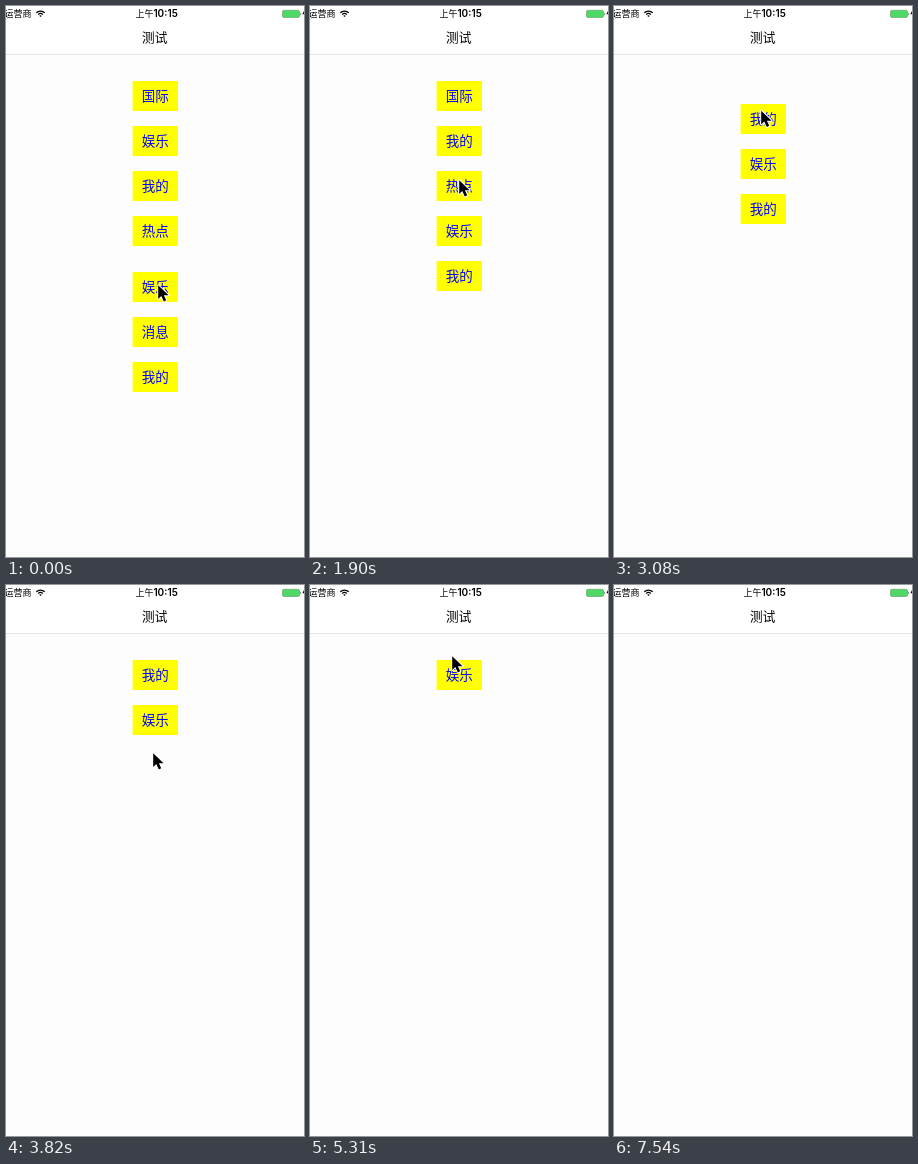
Write an HTML page that moves like this. It is 298 by 551 pixels and loops after 7.84 s.

```html
<!DOCTYPE html>
<html lang="zh-CN">
<head>
<meta charset="utf-8">
<title>测试</title>
<style>
  html, body { margin: 0; width: 100%; height: 100%; overflow: hidden; background: #fdfdfd; }
  svg { display: block; }
  text { font-family: "Noto Sans CJK SC", "Noto Sans CJK", sans-serif; }
  .num { font: 600 10px Inter, sans-serif; }
  .status { font-size: 9px; }
  .medium { font-weight: 500; }
  .title { font-size: 12.6px; font-weight: 500; text-anchor: middle; }
  .tag text { font-size: 13.5px; fill: #00f; text-anchor: middle; }
  .tag rect { fill: #ff0; }
</style>
</head>
<body>
<svg id="stage" width="298" height="551" viewBox="0 0 298 551">
  <rect width="298" height="551" fill="#fdfdfd"/>
  <rect width="298" height="48" fill="#fff"/>
  <rect y="48" width="298" height="1" fill="#e3e3e3"/>

  <text class="status" x="-1.5" y="11.3">运营商</text>
  <g fill="none" stroke="#000" stroke-width="1.2">
    <path d="M30.3 6.8a6 6 0 0 1 8.4 0"/>
    <path d="M32.1 8.6a3.5 3.5 0 0 1 4.8 0"/>
  </g>
  <path d="M33.2 9.7a2 2 0 0 1 2.6 0L34.5 11.1Z"/>
  <text class="status medium" x="129.4" y="11.3">上午</text>
  <text class="num" x="147.4" y="11.3">10:15</text>
  <rect x="276.5" y="4.3" width="17" height="7.2" rx="1.4" fill="#4cd964" stroke="#76a97f" stroke-width=".8"/>
  <path d="M294.4 6.4q1.2 1.5 0 3Z"/>
  <path d="M298 5l-1.6 3.2H298Z"/>
  <text class="title" x="148.7" y="36.2">测试</text>

  <g id="tags"></g>
  <path id="cursor" d="M1.2 1.3V14.9L4.3 12 6.8 17.4 9.2 16.3 6.9 11.2H11.6Z"
        stroke="#fff" stroke-width="2" stroke-linejoin="round" paint-order="stroke"/>
</svg>
<script>
const LOOP = 7840, TOP = 75, PITCH = 45, SLIDE = 250;
const TICK = 147.5, LEAD = 20;        // screen refresh interval and its phase
const AWAY = 6470, BACK = 7060, EXIT = 7500;

// Label and the moment it is tapped away; the unnamed one has just gone at the start
const items = [
  ['国际', 2954], ['娱乐', 1370], ['我的', 5034], ['热点', 2239],
  ['', -169], ['娱乐', 6170], ['消息', 480], ['我的', 3810]
].map(([label, gone]) => ({ label, gone, node: makeTag(label) }));

// Pointer stops: time, x, y
const stops = [
  [0, 151, 278], [290, 149, 318], [580, 149, 318], [1012, 142, 117],
  [1470, 144, 129], [1897, 148, 173], [2340, 148, 176], [3077, 146, 103.5],
  [3660, 146, 167], [3815, 146, 167], [4860, 141, 82], [5290, 141, 70],
  [5910, 146, 86], [AWAY, 146, 86], [BACK, 267, 450], [EXIT, 290, 551]
];

const cursor = document.getElementById('cursor');

function makeTag(label) {
  const g = document.createElementNS('http://www.w3.org/2000/svg', 'g');
  g.setAttribute('class', 'tag');
  g.innerHTML = `<rect x="126.6" width="45.4" height="30"/><text x="149.2" y="20.1">${label}</text>`;
  document.getElementById('tags').append(g);
  return g;
}

const place = (node, x, y) => node.setAttribute('transform', `translate(${x} ${y})`);
const show = (node, on) => node.setAttribute('visibility', on ? 'visible' : 'hidden');

function ease(u) {
  u = Math.min(1, Math.max(0, u));
  return u * u * (3 - 2 * u);
}

function pointerAt(t) {
  const i = Math.max(1, stops.findIndex(s => s[0] >= t));
  const [t0, x0, y0] = stops[i - 1], [t1, x1, y1] = stops[i];
  const u = ease((t - t0) / (t1 - t0));
  return [x0 + (x1 - x0) * u, y0 + (y1 - y0) * u];
}

function draw(t) {
  let y = TOP;
  for (const { label, gone, node } of items) {
    show(node, label && t < gone);
    place(node, 0, Math.round(y));
    y += PITCH * (1 - ease((t - gone) / SLIDE));
  }
  const seen = t < AWAY || (t >= BACK && t < EXIT);
  show(cursor, seen);
  if (seen) place(cursor, ...pointerAt(t));
}

const start = performance.now();
function frame() {
  const t = (performance.now() - start) % LOOP;
  draw(Math.max(0, Math.floor((t + LEAD) / TICK) * TICK - LEAD));
  requestAnimationFrame(frame);
}
frame();
</script>
</body>
</html>
```
